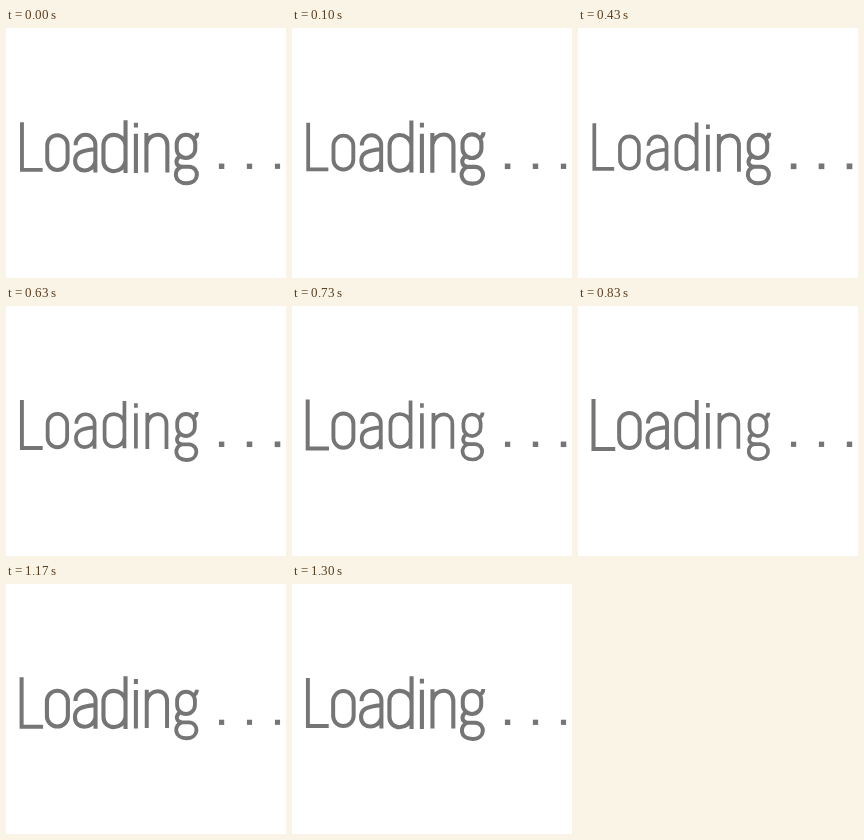
An HTML page that plays this animation: 280x250 px, repeating every 1.33 s.

```html
<!DOCTYPE html>
<html lang="en">
<head>
<meta charset="utf-8">
<title>Loading . . .</title>
<style>
  html, body { margin: 0; height: 100%; overflow: hidden; background: #fff; }
  svg { display: block; }
  path { fill: none; stroke: #757575; stroke-width: 3.9; }
</style>
</head>
<body>
<svg id="word" width="280" height="250" viewBox="0 0 280 250" role="img" aria-label="Loading . . ."></svg>
<script>
const PERIOD = 1330, STAGGER = 95, FIRST_PEAK = 970, SWELL = 0.055;

const period = x => ({ d: `M${x - 2.7} 138.3h5.4`, cx: x, cy: 138.3, width: 5.4 });

// Pen strokes of each glyph and the centre it swells around
const glyphs = [
  { d: 'M15.9 94V142H36.7', cx: 25, cy: 119 },
  { d: 'M41.4 117.5A10 10 0 0 1 61.4 117.5V131.7A10 10 0 0 1 41.4 131.7Z', cx: 51.4, cy: 124.6 },
  { d: 'M70 117.5V117A9.5 9.5 0 0 1 89 117V143.7M89 121.3C74 122.5 69.5 125.5 69.5 132.7C69.5 145 87 144.5 89 133', cx: 79.5, cy: 124.6 },
  { d: 'M119 93.5V143.7M119 117C117 104.5 98 104 98 117.5V132C98 145.5 117 145 119 132.5', cx: 108.5, cy: 119 },
  { d: 'M129.9 106.5V143.7M129.9 96v4.6', cx: 129.9, cy: 120 },
  { d: 'M140.9 106V143.7M140.9 117C143 104.5 160.9 104 160.9 117.5V143.7', cx: 151, cy: 124.6 },
  { d: 'M171 116.5A9 9 0 0 1 189 116.5V121A9 9 0 0 1 171 121ZM186.5 111.5Q191 110 191 105.5'
     + 'M174.5 128C169.5 131 169 137.5 176 138.5H183C193.5 139 193.5 154.5 180.5 154.5C167.5 154.5 167.5 140.5 176 138.5', cx: 180.5, cy: 131 },
  period(215.6), period(243.5), period(271.5)
];

const parts = glyphs.map(({ d, width }) => {
  const path = document.createElementNS('http://www.w3.org/2000/svg', 'path');
  path.setAttribute('d', d);
  if (width) path.style.strokeWidth = width;
  return word.appendChild(path);
});

function draw(time) {
  parts.forEach((path, i) => {
    const { cx, cy } = glyphs[i];
    const phase = (time - FIRST_PEAK - i * STAGGER) / PERIOD;
    const scale = 1 + SWELL * Math.cos(2 * Math.PI * phase);
    path.setAttribute('transform', `translate(${cx} ${cy}) scale(${scale}) translate(${-cx} ${-cy})`);
  });
}

const start = performance.now();
function tick() {
  draw((performance.now() - start) % PERIOD);
  requestAnimationFrame(tick);
}
draw(0);
tick();
</script>
</body>
</html>
```
